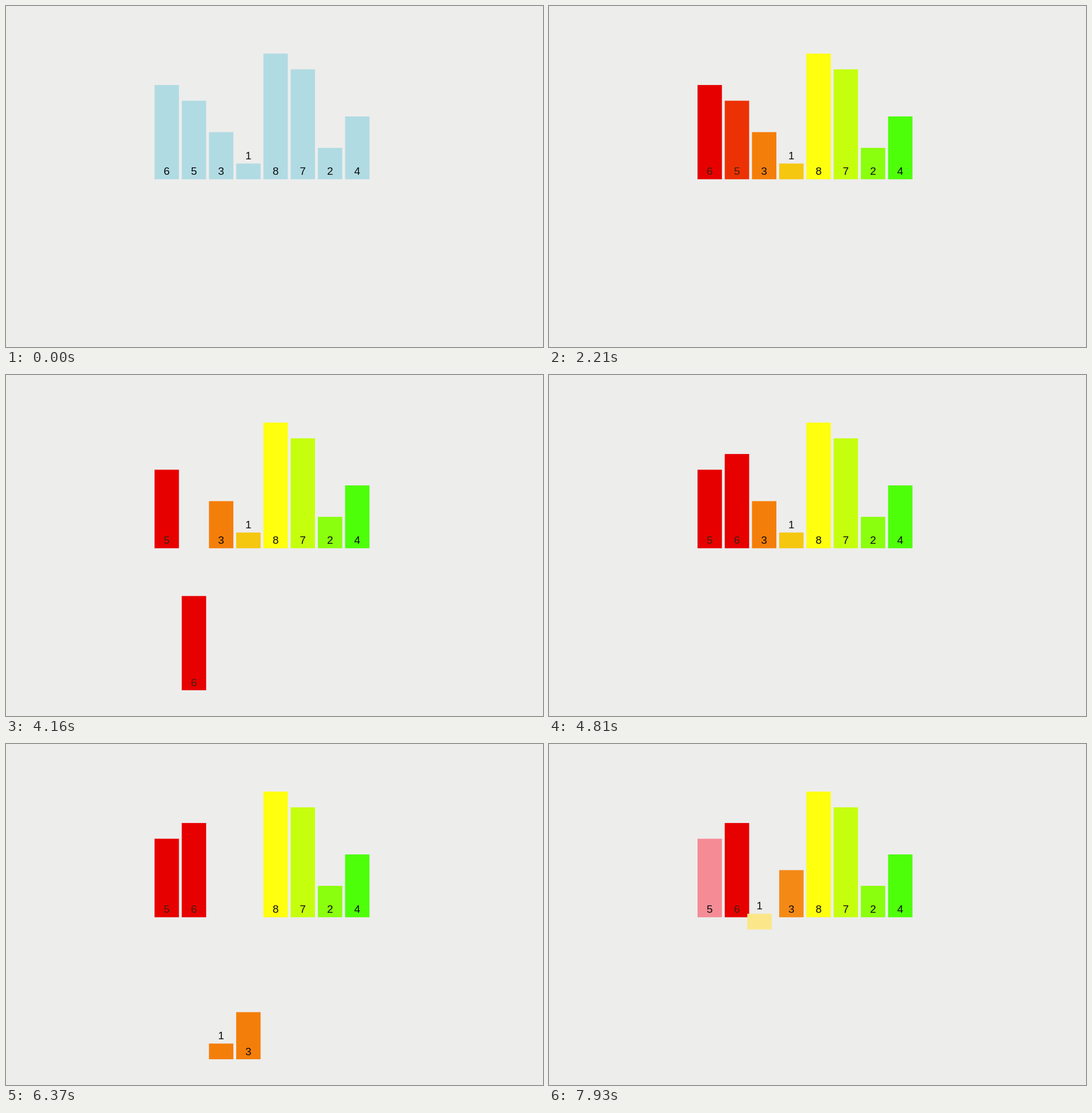
An HTML page with a canvas for the animation above (8 s loop, 940 by 596 pixels).

```html
<!DOCTYPE html>
<html lang="en">
<head>
<meta charset="utf-8">
<title>Merge sort</title>
<style>
html, body { margin: 0; width: 100%; height: 100%; overflow: hidden; background: #ededec; }
canvas { display: block; }
</style>
</head>
<body>
<canvas id="stage" width="940" height="596"></canvas>
<script>
const ctx = document.getElementById('stage').getContext('2d');

const LOOP = 8000, TICK = 130;
const START = 1926.5, STEP = 494.5, GLIDE = 250;
const LEFT = 260, PITCH = 47.65, WIDTH = 42.7;
const BASE = 302.8, UNIT = 27.45, DROP = 248.2;

const values = [6, 5, 3, 1, 8, 7, 2, 4];
const blue = [177, 219, 227], pink = [245, 140, 149], pale = [253, 253, 150];
const hues = [
  [231, 0, 0], [236, 50, 4], [244, 126, 10], [246, 199, 15],
  [255, 255, 14], [197, 255, 14], [138, 255, 14], [78, 255, 10]
];
const [red, , orange] = hues;

// Each step maps bar indexes to their new properties.
const steps = [
  hues.map(color => ({ color })),
  { 0: { color: pink }, 1: { color: pink } },
  { 1: { slot: 0, low: 1, color: red } },
  { 0: { slot: 1, low: 1, color: red } },
  { 1: { low: 0 } },
  { 0: { low: 0 } },
  { 2: { color: pale }, 3: { color: pale } },
  { 3: { slot: 2, low: 1, color: orange } },
  { 2: { slot: 3, low: 1, color: orange } },
  { 3: { low: 0 } },
  { 2: { low: 0 } },
  { 1: { color: pink }, 3: { color: pale } },
  { 3: { slot: 0, low: 1, color: red }, 2: { color: pale } }
];

const ease = p => p < 0.5 ? 4 * p ** 3 : 1 - 4 * (1 - p) ** 3;
const mix = (a, b, p) => Array.isArray(a) ? a.map((v, i) => mix(v, b[i], p)) : a + (b - a) * p;

function barsAt(time) {
  const bars = values.map((value, slot) => ({ value, slot, low: 0, color: blue }));
  steps.forEach((step, k) => {
    const p = ease(Math.min(1, Math.max(0, (time - START - k * STEP) / GLIDE)));
    for (const i in step)
      for (const key in step[i]) bars[i][key] = mix(bars[i][key], step[i][key], p);
  });
  return bars;
}

function drawBar({ value, slot, low, color }) {
  const x = LEFT + slot * PITCH;
  const bottom = BASE + low * DROP;
  const height = value * UNIT;
  ctx.fillStyle = `rgb(${color.map(Math.round)})`;
  ctx.fillRect(x, bottom - height, WIDTH, height);
  ctx.fillStyle = color[1] < 60 ? '#42200f' : '#0c0c0c';
  // A bar of height one is too short to hold its label.
  ctx.fillText(value, x + WIDTH / 2, bottom - 7.5 - (value === 1 ? UNIT : 0));
}

function frame(now) {
  const time = Math.floor(now % LOOP / TICK) * TICK;
  ctx.fillStyle = '#ededec';
  ctx.fillRect(0, 0, 940, 596);
  ctx.font = '19px "Liberation Sans", Arial, sans-serif';
  ctx.textAlign = 'center';
  barsAt(time).forEach(drawBar);
  requestAnimationFrame(frame);
}
frame(performance.now());
</script>
</body>
</html>
```
